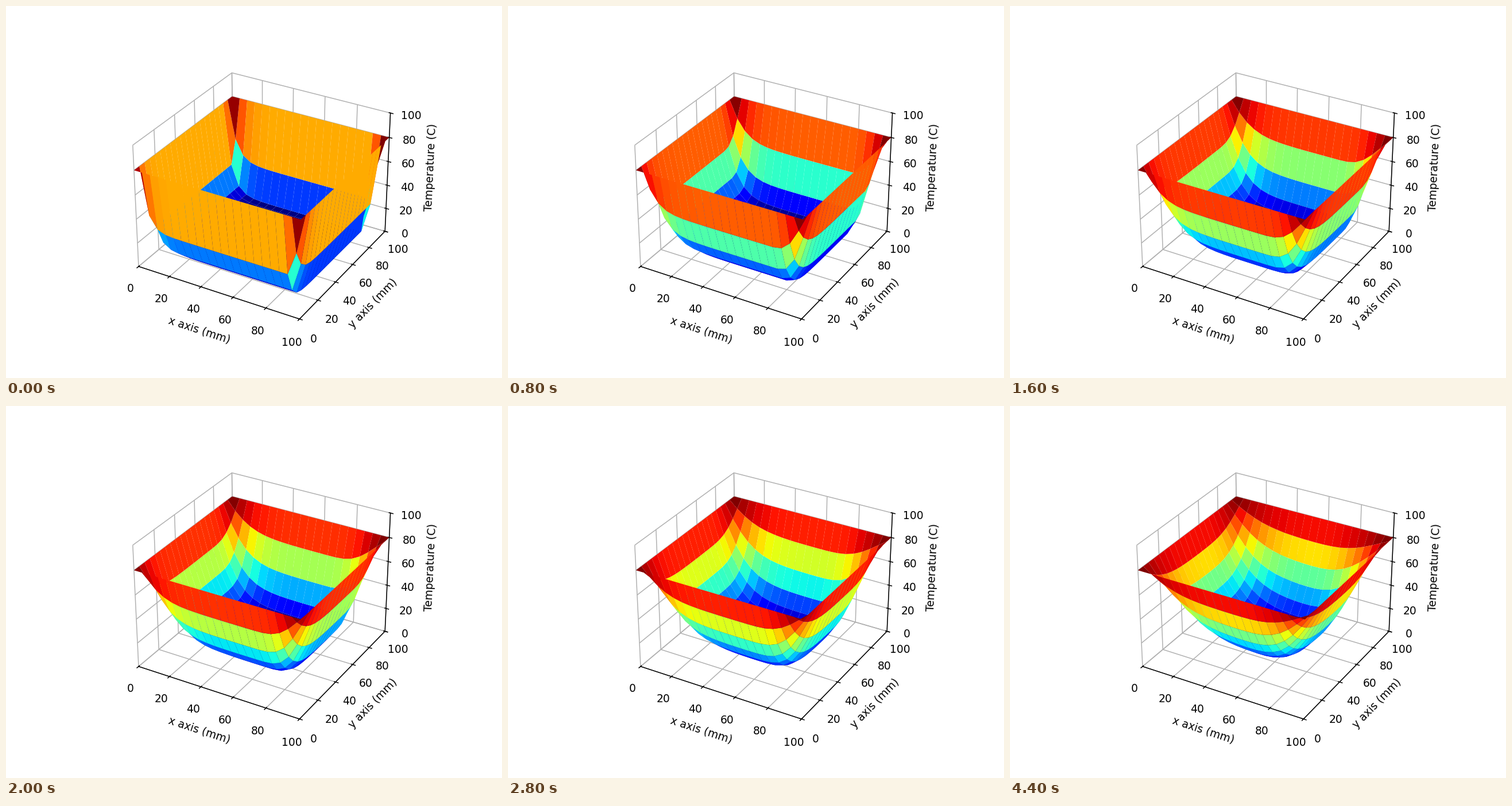
These frames come from a looping animation (864x648 px, 4800 ms). A matplotlib script:

```python
import numpy as np
import matplotlib.pyplot as plt
from matplotlib.animation import FuncAnimation

SIZE = 100        # plate side, mm
NODES = 21
EDGE_TEMP = 80
START_TEMP = 3
FRAMES = 12
INTERVAL = 400    # ms


def relax(temp):
    """One in-place sweep: each inner node becomes the mean of its neighbours."""
    for i in range(1, NODES - 1):
        for j in range(1, NODES - 1):
            temp[i, j] = (temp[i - 1, j] + temp[i + 1, j]
                          + temp[i, j - 1] + temp[i, j + 1]) / 4


def solve():
    temp = np.full((NODES, NODES), float(EDGE_TEMP))
    temp[1:-1, 1:-1] = START_TEMP
    states = []
    for _ in range(FRAMES):
        relax(temp)
        states.append(temp.copy())
    return states


side = np.linspace(0, SIZE, NODES)
X, Y = np.meshgrid(side, side)
states = solve()

fig = plt.figure(figsize=(6.4, 4.8), dpi=135)
ax = fig.add_subplot(projection="3d")
ax.set(xlim=(0, SIZE), ylim=(0, SIZE), zlim=(0, 100),
       xlabel="x axis (mm)", ylabel="y axis (mm)", zlabel="Temperature (C)")
for axis in (ax.xaxis, ax.yaxis, ax.zaxis):
    axis.set_pane_color((1, 1, 1, 1))


def draw(frame):
    for surface in list(ax.collections):
        surface.remove()
    return [ax.plot_surface(X, Y, states[frame], cmap="jet")]


anim = FuncAnimation(fig, draw, frames=FRAMES, interval=INTERVAL,
                     init_func=lambda: draw(0), repeat=True, repeat_delay=0)
plt.show()
```
